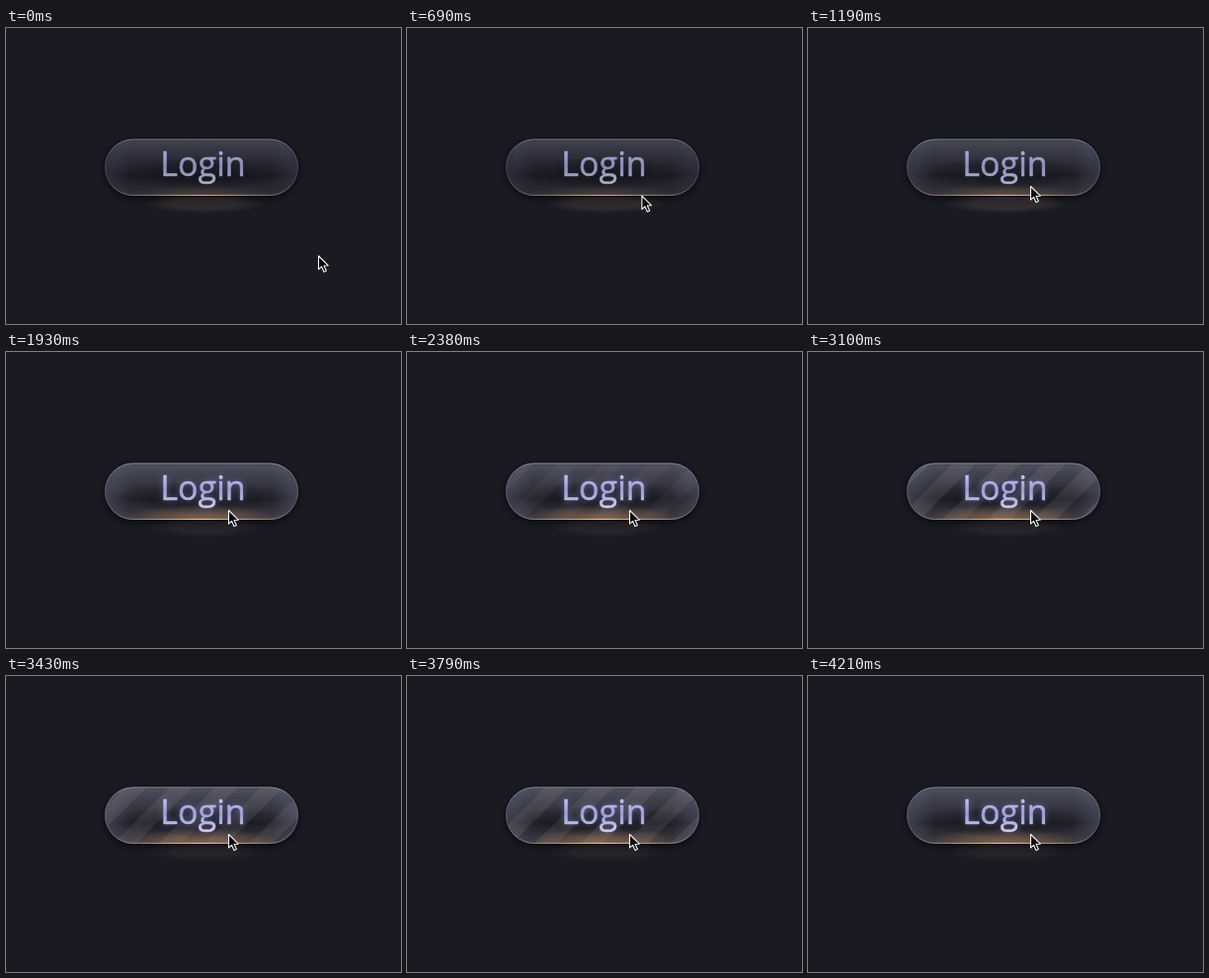
Recreate the animation shown at these times as an HTML page with a canvas. Size 400 px wide and 300 px high, loop 4570 ms.

```html
<!DOCTYPE html>
<html lang="en">
<head>
<meta charset="utf-8">
<title>Login button</title>
<style>
html, body { margin: 0; width: 100%; height: 100%; overflow: hidden; background: #1a1b22; }
canvas { display: block; width: 400px; height: 300px; }
</style>
</head>
<body>
<canvas id="stage" width="400" height="300"></canvas>
<script>
const ctx = document.getElementById('stage').getContext('2d');
const LOOP = 4570;
const BTN = { x: 100, y: 112.5, w: 196, h: 57.5 };
const CX = 198;

const clamp = v => Math.min(1, Math.max(0, v));
const span = (t, a, b) => clamp((t - a) / (b - a));
const smooth = u => u * u * (3 - 2 * u);
const mix = (a, b, u) => a + (b - a) * u;
const rgba = (rgb, a) => `rgba(${rgb},${a})`;
const blend = (a, b, u) => `rgb(${a.map((v, i) => Math.round(mix(v, b[i], u)))})`;

function linear(x0, y0, x1, y1, stops) {
  const g = ctx.createLinearGradient(x0, y0, x1, y1);
  stops.forEach(([at, color]) => g.addColorStop(at, color));
  return g;
}

function pill(inset = 0) {
  const { x, y, w, h } = BTN;
  ctx.beginPath();
  ctx.roundRect(x + inset, y + inset, w - inset * 2, h - inset * 2, h / 2 - inset);
}

// Soft elliptical light or shade
function glow(x, y, rx, ry, rgb, alpha, core = 0) {
  ctx.save();
  ctx.translate(x, y);
  ctx.scale(rx, ry);
  const g = ctx.createRadialGradient(0, 0, 0, 0, 0, 1);
  g.addColorStop(0, rgba(rgb, alpha));
  g.addColorStop(core, rgba(rgb, alpha));
  g.addColorStop(1, rgba(rgb, 0));
  ctx.fillStyle = g;
  ctx.beginPath();
  ctx.arc(0, 0, 1, 0, Math.PI * 2);
  ctx.fill();
  ctx.restore();
}

function drawStripes(t, alpha) {
  if (alpha <= 0) return;
  const period = 46, half = 11.5;
  const shift = (152 + (t - 2740) * 0.0565) % period;
  const top = BTN.y, bottom = BTN.y + BTN.h;
  ctx.fillStyle = rgba('205,195,200', 0.095 * alpha);
  for (let x = shift - period; x < 400; x += period) {
    const a = x + 145 - top, b = x + 145 - bottom;
    ctx.beginPath();
    ctx.moveTo(a - half, top);
    ctx.lineTo(a + half, top);
    ctx.lineTo(b + half, bottom);
    ctx.lineTo(b - half, bottom);
    ctx.fill();
  }
}

function drawBody(t, hover, press, stripes) {
  const lit = hover * 0.4 + press * 0.6;
  const right = BTN.x + BTN.w, bottom = BTN.y + BTN.h;

  ctx.save();
  ctx.shadowColor = 'rgba(0,0,0,0.75)';
  ctx.shadowBlur = 9;
  ctx.shadowOffsetY = 2;
  ctx.fillStyle = '#1d1e25';
  pill();
  ctx.fill();
  ctx.restore();

  // Light spilled under the button
  ctx.save();
  ctx.beginPath();
  ctx.rect(0, bottom, 400, 40);
  ctx.clip();
  const spill = mix(mix(0.16, 0.2, hover), 0.09, press);
  glow(201, 178, mix(60, 64, hover) - press * 7, 10, '150,122,105', spill, 0.55);
  ctx.restore();

  ctx.save();
  pill();
  ctx.clip();
  ctx.fillStyle = linear(0, BTN.y, 0, bottom, [
    [0, blend([58, 59, 71], [72, 73, 86], lit)],
    [0.2, blend([46, 47, 58], [59, 60, 71], lit)],
    [0.5, blend([34, 35, 44], [44, 45, 54], lit)],
    [0.62, blend([30, 31, 39], [38, 39, 48], lit)],
    [0.8, blend([36, 36, 44], [46, 45, 54], lit)],
    [1, blend([46, 46, 54], [62, 59, 66], lit)]
  ]);
  ctx.fillRect(BTN.x, BTN.y, BTN.w, BTN.h);
  glow(CX, 147, 94, 16, '18,19,25', 0.62, 0.45);

  // Rounded gloss on the upper half
  ctx.beginPath();
  ctx.roundRect(107, 115, 182, 36, 18);
  ctx.fillStyle = linear(0, 115, 0, 151, [
    [0, 'rgba(150,150,175,0.09)'],
    [0.65, 'rgba(130,130,155,0.02)'],
    [1, 'rgba(0,0,0,0.09)']
  ]);
  ctx.fill();

  const rim = rgba('130,130,165', mix(0.13, 0.26, lit));
  ctx.fillStyle = linear(BTN.x, 0, right, 0, [
    [0, rim], [0.14, 'rgba(130,130,165,0)'],
    [0.86, 'rgba(130,130,165,0)'], [1, rim]
  ]);
  ctx.fillRect(BTN.x, BTN.y, BTN.w, BTN.h);

  drawStripes(t, stripes);
  glow(CX, bottom + 1, 80, mix(11, 17, press), '220,155,95', mix(mix(0.2, 0.28, hover), 0.48, press));
  ctx.restore();

  ctx.lineWidth = 1;
  pill(0.5);
  ctx.strokeStyle = linear(0, BTN.y, 0, bottom, [
    [0, rgba('155,155,175', mix(0.66, 0.78, lit))],
    [0.35, rgba('120,120,145', mix(0.3, 0.42, lit))],
    [0.7, rgba('120,120,140', mix(0.3, 0.42, lit))],
    [1, rgba('150,145,150', mix(0.62, 0.75, lit))]
  ]);
  ctx.stroke();
  ctx.fillStyle = linear(125, 0, 271, 0, [
    [0, 'rgba(235,185,130,0)'],
    [0.5, rgba('246,200,145', mix(0.72, 1, lit))],
    [1, 'rgba(235,185,130,0)']
  ]);
  ctx.fillRect(125, bottom - 1, 146, 1);
}

function drawLabel(press) {
  ctx.save();
  ctx.font = '34px "Open Sans", "Noto Sans", sans-serif';
  ctx.textAlign = 'center';
  ctx.lineJoin = 'round';
  ctx.shadowColor = press > 0 ? rgba('125,125,205', 0.75 * press) : 'transparent';
  ctx.shadowBlur = 7;
  const ink = linear(0, 125, 0, 158, [
    [0, blend([166, 168, 216], [192, 194, 240], press)],
    [0.45, blend([139, 141, 184], [157, 159, 210], press)],
    [1, blend([174, 174, 200], [208, 207, 228], press)]
  ]);
  ctx.fillStyle = ctx.strokeStyle = ink;
  ctx.fillText('Login', CX + 1.5, 150);
  ctx.shadowColor = 'transparent';
  ctx.lineWidth = 0.5;
  ctx.strokeText('Login', CX + 1.5, 150);
  ctx.restore();
}

function drawCursor(x, y) {
  const arrow = [[0.5, 0.5], [0.5, 14.2], [3.6, 11.4], [6, 16.7], [8.4, 15.6], [6, 10.5], [10.2, 10.2]];
  ctx.save();
  ctx.translate(x, y);
  ctx.beginPath();
  arrow.forEach(([px, py]) => ctx.lineTo(px, py));
  ctx.closePath();
  ctx.fillStyle = '#08080b';
  ctx.fill();
  ctx.strokeStyle = '#f4f4f6';
  ctx.lineWidth = 1.1;
  ctx.lineJoin = 'round';
  ctx.stroke();
  ctx.restore();
}

function draw(t) {
  const hover = smooth(span(t, 700, 900));
  const press = smooth(span(t, 1070, 1560));
  const stripes = span(t, 1750, 2650) ** 2 * (1 - smooth(span(t, 3910, 4210)));
  const move = 1 - (1 - span(t, 30, 900)) ** 1.4;

  ctx.fillStyle = '#1a1b22';
  ctx.fillRect(0, 0, 400, 300);
  drawBody(t, hover, press, stripes);
  drawLabel(press);
  drawCursor(mix(316, 225, move), mix(230.5, 160, move));
}

const start = performance.now();
function tick() {
  draw((performance.now() - start) % LOOP);
  requestAnimationFrame(tick);
}
tick();
</script>
</body>
</html>
```
